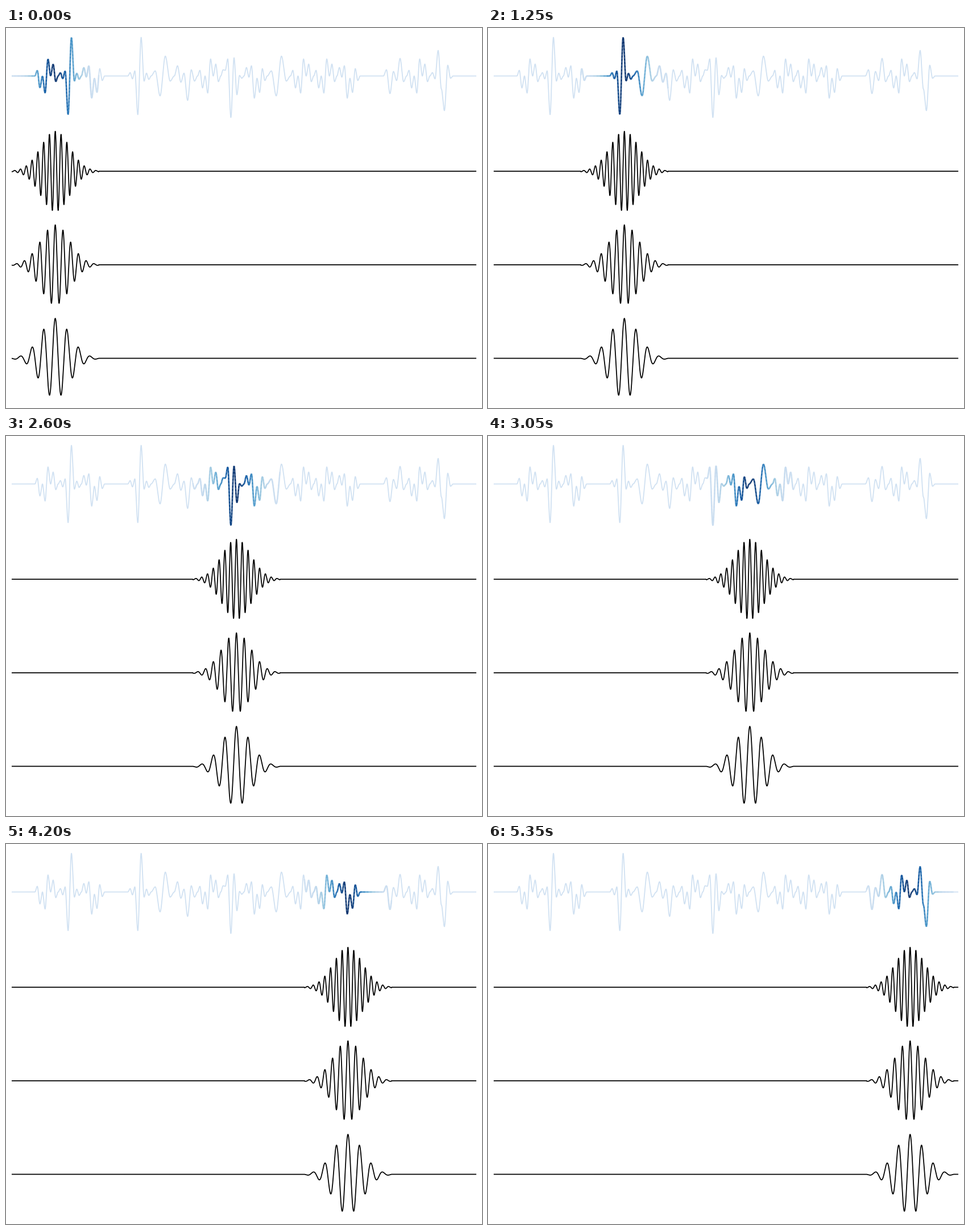
Recreate the animation shown at these times as a matplotlib script. Size 837x669 px, loop 5400 ms.

```python
import numpy as np
import matplotlib.pyplot as plt
from matplotlib.animation import FuncAnimation
from matplotlib.collections import LineCollection

W, H, DPI = 837, 669, 64
PX = 72 / DPI                    # points per pixel
X0, X1 = 10, 827
UNIT = (X1 - X0) / 400           # one signal sample
SLOT = 20 * UNIT                 # one motif
SIGMA = 12.5 * UNIT              # the window spans +-3 sigma
REACH = 3 * SIGMA
FRAMES = 108
BASE = 84.5


def odd(*half):
    """Half a motif followed by its point reflection."""
    return [*half, *(-h for h in reversed(half))]


# Heights of successive peaks and dips above the base line
MOTIFS = {
    "-": [],
    "a": odd(10, -21, 0, -30),
    "b": odd(6, -5, 9, -68),
    "c": [15, -2, 18, -39, -4, -29, 13, -8],
    "d": odd(9, -35),
    "e": [18, -11, 5, -43, 11, -9],
    "f": [11, 10, 30, -73, 32, -33, 1, -4],
    "g": [11, -31, 8, -8, 31, -10],
    "h": [6, -5, 45, -23, -61, 19, -4],
}
SIGNAL = "-abc-bdeafcdaac-gah-"


def signal_knots():
    """Knots of all slots; taller swings take a little more room."""
    kx, ky = [X0], [BASE]
    for i, name in enumerate(SIGNAL):
        heights = np.array([0, *MOTIFS[name], 0])
        room = np.cumsum((np.abs(np.diff(heights)) + 30) ** 0.25)
        kx.extend(X0 + SLOT * (i + room / room[-1]))
        ky.extend(BASE - heights[1:])
    return np.array(kx), np.array(ky)


def smooth(x, kx, ky):
    """Cubic through the knots, level at each of them."""
    i = np.clip(np.searchsorted(kx, x, side="right") - 1, 0, len(kx) - 2)
    t = (x - kx[i]) / (kx[i + 1] - kx[i])
    return ky[i] + (ky[i + 1] - ky[i]) * t * t * (3 - 2 * t)


def gauss(x, c):
    return np.exp(-0.5 * ((x - c) / SIGMA) ** 2)


def wavelet(x, c, freq):
    wave = gauss(x, c) * np.cos(2 * np.pi * freq * (x - c) / UNIT)
    return np.where(np.abs(x - c) <= REACH, wave, 0)


def split(x, y, step):
    """Cut a curve into short straight pieces of equal length."""
    length = np.concatenate([[0], np.cumsum(np.hypot(np.diff(x), np.diff(y)))])
    s = np.linspace(0, length[-1], int(length[-1] / step))
    pts = np.column_stack([np.interp(s, length, x), np.interp(s, length, y)])
    return np.stack([pts[:-1], pts[1:]], axis=1)


x = np.linspace(X0, X1, 4001)
y = smooth(x, *signal_knots())
pieces = split(x, y, 1.2)
mids = pieces[:, :, 0].mean(axis=1)

fig = plt.figure(figsize=(W / DPI, H / DPI), dpi=DPI, facecolor="white")
ax = fig.add_axes([0, 0, 1, 1])
ax.set(xlim=(0, W), ylim=(H, 0))
ax.axis("off")


def draw_line(y, color):
    return ax.plot(x, y, color=color, lw=1.75 * PX, solid_capstyle="butt",
                   solid_joinstyle="round", snap=False)[0]


blues = plt.get_cmap("Blues")
draw_line(y, blues(0.2))
glow = LineCollection([], linewidths=2.6 * PX, capstyle="butt", snap=False, zorder=3)
ax.add_collection(glow)

rows = [(252.2 + 164.65 * k, 0.2 - 0.05 * k) for k in range(3)]
waves = [draw_line(np.full_like(x, base), "black") for base, _ in rows]


def update(i):
    c = X0 + (37.5 + 3 * i) * UNIT
    near = np.abs(mids - c) <= REACH
    glow.set_segments(pieces[near])
    glow.set_color(blues(0.2 + 0.8 * gauss(mids[near], c)))
    for line, (base, freq) in zip(waves, rows):
        line.set_ydata(base - 70.3 * wavelet(x, c, freq))
    return [glow, *waves]


anim = FuncAnimation(fig, update, frames=FRAMES, interval=50,
                     repeat=True, repeat_delay=0, blit=False)
plt.show()
```
